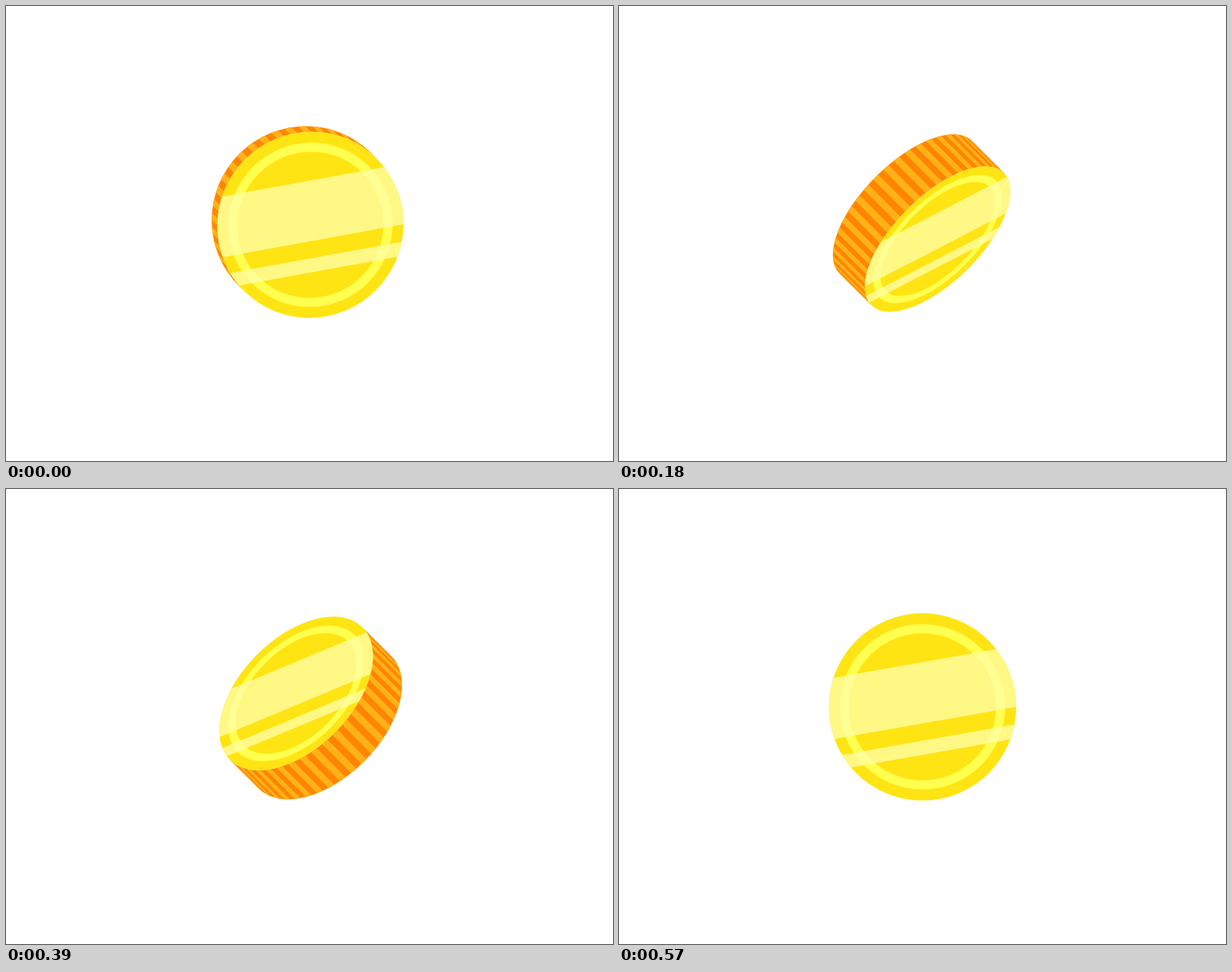
Recreate the animation shown at these times as an HTML page with a canvas. Size 800 px wide and 600 px high, loop 0.6 s.

```html
<!DOCTYPE html>
<html lang="en">
<head>
<meta charset="utf-8">
<title>Flipping coin</title>
<style>
  html, body { margin: 0; width: 100%; height: 100%; overflow: hidden; background: #fff; }
  canvas { display: block; }
</style>
</head>
<body>
<canvas id="stage" width="800" height="600"></canvas>
<script>
const ctx = document.getElementById('stage').getContext('2d');

const STEP_MS = 30;
const STEPS = 20;
const CENTER = { x: 400, y: 287.3 };
const RADIUS = 123.5;
const HALF_DEPTH = 23.7; // per screen axis
const PIVOT_SHIFT = 2.5;
const RIDGES = 42;
const RING = { outer: 109, inner: 97 };
const SHINE = [[-58, 21.4], [44, 62.3]];
const COLOR = {
  face: '#ffe414',
  ring: '#ffff50',
  shine: 'rgba(255, 255, 171, 0.75)',
  rimDark: '#ff8500',
  rimLight: '#ffb217'
};

// Disc plane: x runs along the diagonal flip axis, y is foreshortened.
function toDisc(shift, squash) {
  const s = Math.SQRT1_2;
  ctx.setTransform(s, -s, s * squash, s * squash, CENTER.x + shift, CENTER.y + shift);
}

function rimPatch(back, front, squash, from, to, color) {
  ctx.beginPath();
  toDisc(back, squash);
  ctx.arc(0, 0, RADIUS, from, to);
  toDisc(front, squash);
  ctx.arc(0, 0, RADIUS, to, from, true);
  ctx.closePath();
  ctx.fillStyle = color;
  ctx.fill();
}

function drawRim(back, front, squash) {
  const pitch = 2 * Math.PI / RIDGES;
  rimPatch(back, front, squash, Math.PI, 2 * Math.PI, COLOR.rimDark);
  for (let i = 0; i < RIDGES / 2; i++) {
    const start = Math.PI + (i + 0.25) * pitch;
    rimPatch(back, front, squash, start, start + pitch / 2, COLOR.rimLight);
  }
}

function drawFace(shift, squash) {
  ctx.save();
  toDisc(shift, squash);
  ctx.beginPath();
  ctx.arc(0, 0, RADIUS, 0, 2 * Math.PI);
  ctx.fillStyle = COLOR.face;
  ctx.fill();
  ctx.clip();

  ctx.beginPath();
  ctx.arc(0, 0, (RING.outer + RING.inner) / 2, 0, 2 * Math.PI);
  ctx.lineWidth = RING.outer - RING.inner;
  ctx.strokeStyle = COLOR.ring;
  ctx.stroke();

  ctx.rotate(35 * Math.PI / 180);
  ctx.fillStyle = COLOR.shine;
  for (const [top, bottom] of SHINE) {
    ctx.fillRect(-RADIUS - 5, top, 2 * RADIUS + 10, bottom - top);
  }
  ctx.restore();
}

function draw(step) {
  ctx.setTransform(1, 0, 0, 1, 0, 0);
  ctx.fillStyle = '#fff';
  ctx.fillRect(0, 0, 800, 600);

  // The coin lies flat and centred on the last step.
  if (step === STEPS - 1) {
    drawFace(0, 1);
    return;
  }
  const angle = (step + 1) * Math.PI / STEPS;
  const squash = Math.cos(angle);
  const middle = -PIVOT_SHIFT * squash;
  // Edge-on, the face has no area, so either side will do.
  const depth = HALF_DEPTH * Math.sin(angle) * (squash > 0 ? 1 : -1);
  drawRim(middle - depth, middle + depth, squash);
  if (Math.abs(squash) > 0.001) drawFace(middle + depth, Math.abs(squash));
}

const began = performance.now();
function tick() {
  const elapsed = Math.max(0, performance.now() - began);
  draw(Math.floor(elapsed / STEP_MS) % STEPS);
  requestAnimationFrame(tick);
}
tick();
</script>
</body>
</html>
```
